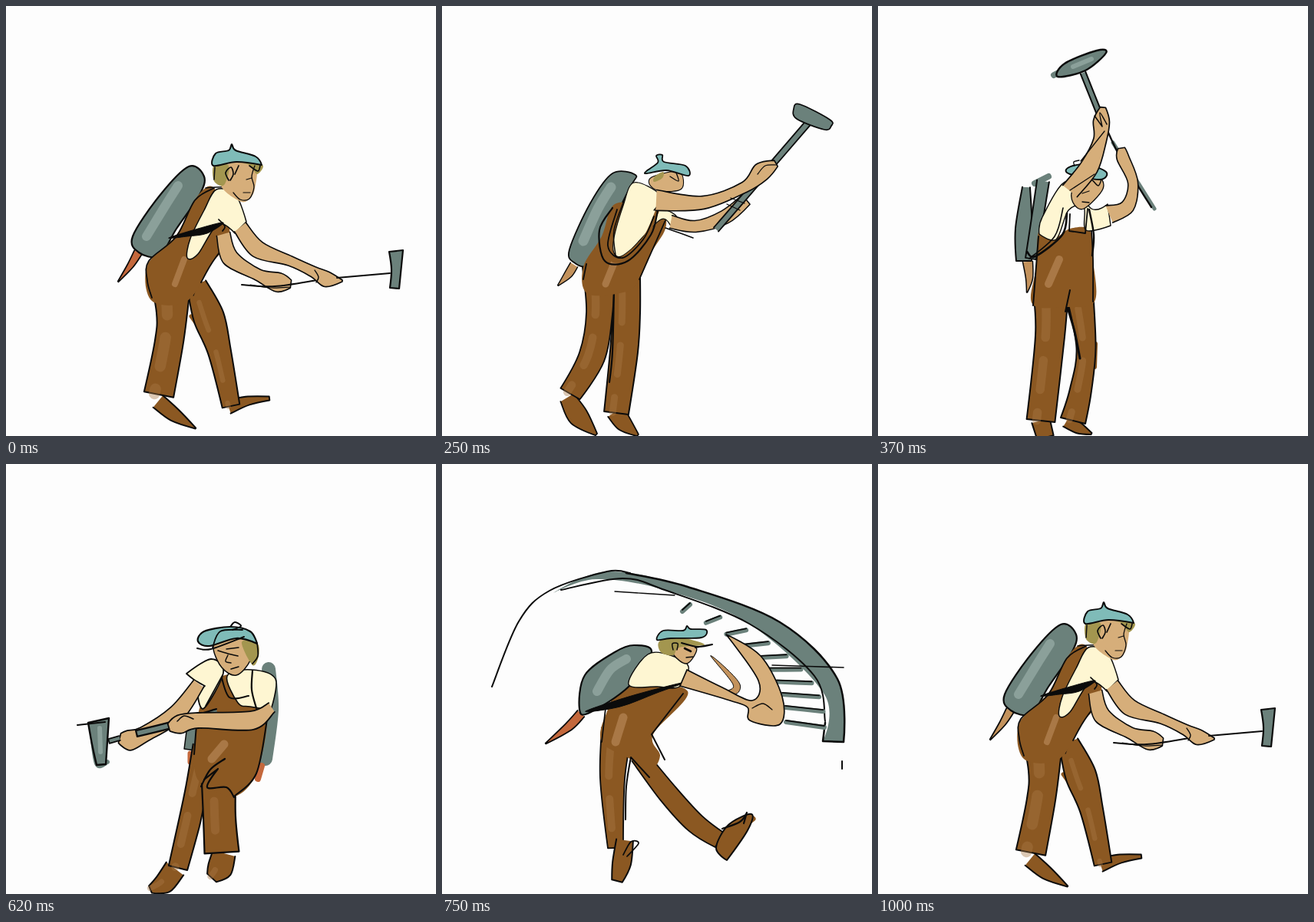
An HTML page for the animation above (1120 ms loop, 560x560 px).

```html
<!DOCTYPE html>
<html lang="en">
<head>
<meta charset="utf-8">
<title>Hammer swing</title>
<style>
html, body { margin: 0; width: 100%; height: 100%; overflow: hidden; background: #fdfdfd; }
svg { display: block; width: 100%; height: 100%; }
</style>
</head>
<body>
<svg id="stage" viewBox="0 0 560 560" fill="none" stroke-linecap="round" stroke-linejoin="round"></svg>
<script>
const INK = '#0b0b0b', BROWN = '#8b5822', LIGHT = '#a97846', GRAY = '#6b817b', MIST = '#8ba09a';
const TEAL = '#7fbbb8', SKIN = '#d6ae7a', CREAM = '#fef6d2', HAIR = '#a3964f', FIRE = '#c4683c', TAN = '#c3925c';
const LOOP = 1120;
let out = '';

const path = (d, fill, stroke, width, extra = '') => {
  out += `<path d="${d}" fill="${fill}" stroke="${stroke}" stroke-width="${width}" ${extra}/>`;
};

// "x,y" points; a trailing "!" makes a sharp corner.
const read = text => text.split(' ').map(s => ({ p: s.replace('!', '').split(',').map(Number), sharp: s.endsWith('!') }));

// Smooth curve through the points.
function curve(pts, closed) {
  const n = pts.length;
  const get = i => pts[closed ? (i + n) % n : Math.max(0, Math.min(n - 1, i))];
  const handle = (i, dir) => {
    const { p, sharp } = get(i);
    if (sharp) return p;
    const a = get(i - 1).p, b = get(i + 1).p;
    return p.map((v, k) => (v + dir * (b[k] - a[k]) / 6).toFixed(1));
  };
  let d = 'M' + pts[0].p;
  for (let i = 0; i < (closed ? n : n - 1); i++) d += `C${handle(i, 1)} ${handle(i + 1, -1)} ${get(i + 1).p}`;
  return d + (closed ? 'Z' : '');
}

const area = (color, ink, text) => path(curve(read(text), true), color, ink ? INK : 'none', ink);
const line = (width, text, color = INK) => path(curve(read(text)), 'none', color, width);

// A tapering shape along "x,y,width" points, with an inked outline open at its root.
function limb(color, ink, text) {
  const axis = text.split(' ').map(s => s.split(',').map(Number)), last = axis.length - 1;
  const side = dir => axis.map(([x, y, w], i) => {
    const a = axis[Math.max(0, i - 1)], b = axis[Math.min(last, i + 1)];
    const dx = b[0] - a[0], dy = b[1] - a[1], k = dir * w / 2 / Math.hypot(dx, dy);
    return { p: [x - dy * k, y + dx * k], sharp: i === last };
  });
  path(curve([...side(1), ...side(-1).reverse()]), color, ink ? INK : 'none', ink);
  if (color === BROWN && axis[0][2] > 25) {
    path(curve(side(.3).map(q => ({ p: q.p }))), 'none', LIGHT, axis[0][2] / 4, 'opacity=".4" stroke-dasharray="38 30" stroke-dashoffset="-24"');
  }
}

// Standing, hammer held low
function standLower(flame) {
  limb(flame, 1.7, '172,321,11 162,338,8 146,359,1');
  limb(BROWN, 2, '198,515,20 220,533,17 247,550,1');
  limb(BROWN, 2, '290,522,18 316,514,11 343,511,5');
  line(5, '241,404 256,425', BROWN);
  limb(BROWN, 2, '248,362,26 264,405,40 278,450,30 293,521,23');
  limb(BROWN, 2, '214,340,58 216,400,40 212,440,37 199,506,39');
  line(1.3, '238,383 245,368');
  line(1.3, '244,377 248,366');
}
function standUpper() {
  area(GRAY, 2.2, '238,209 258,222 252,246 222,290 200,325 173,321 165,300 200,247');
  line(12, '224,234 205,264 183,300', MIST);
  area(BROWN, 0, '271,237 246,252 222,298 184,338 190,384 236,384 268,335 292,301');
  line(1.8, '271,237 246,253 222,300 186,332 184,358 190,380');
  line(1.8, '292,302 268,335 254,360');
  line(8, '232,330 220,362', LIGHT);
  area(CREAM, 1.5, '274,239 299,246 313,281! 298,296! 276,284 250,323 236,328 240,303 258,266');
  area(INK, 1, '212,302 250,290 283,282 262,296 236,300');
  line(1.7, '277,278 285,287 282,293');
  line(1.5, '260,237 285,236 297,243');
}
function standHead() {
  area(SKIN, 0, '287,207 324,206 324,238 316,252 304,254 280,234');
  area(HAIR, 0, '271,207 290,208 284,233 271,228');
  area(HAIR, 0, '305,205 334,207 327,219 317,207');
  line(1.3, '324,208 320,222 323,236 317,251 305,252 296,243');
  line(1.5, '272,210 271,226');
  line(1.7, '290,227 286,217 293,210 296,219 292,227');
  line(1.7, '303,208 298,219');
  line(1.7, '317,208 328,215 331,208');
  line(1.2, '313,226 320,224');
  line(1.2, '309,243 318,243');
  area(TEAL, 2, '270,208 273,192 290,188 294,180 299,188 325,196 333,207! 300,203');
}
function standArms() {
  limb(SKIN, 1.6, '283,297,18 292,328,22 328,350,15 355,360,25 371,362,10');
  line(2, '307,363 350,365 405,357');
  line(1.2, '318,363 345,367 370,366');
  limb(SKIN, 1.7, '305,288,19 328,317,22 370,332,13 400,346,14 418,356,20 438,358,2');
  line(2, '431,354 500,348');
  line(1.4, '402,344 407,353 404,360');
  area(GRAY, 2.2, '499,320! 517,318! 512,368! 500,367! 502,343');
}

// Hammer lifted in front
function raiseLower() {
  limb(TAN, 1.4, '172,337,11 164,350,10 151,364,1');
  limb(BROWN, 1.8, '163,510,20 178,535,26 201,558,3');
  limb(BROWN, 1.8, '226,528,24 238,545,20 255,559,3');
  limb(BROWN, 2, '240,350,36 240,400,36 237,450,36 227,530,32');
  limb(BROWN, 1.8, '204,340,42 205,400,34 195,457,34 167,505,29');
  line(2.2, '224,369 222,450 218,490');
}
function raiseUpper() {
  area(GRAY, 1.8, '252,220 222,218 193,257 166,317 172,334 191,337 212,300 245,236');
  line(13, '220,236 203,264 184,306', MIST);
  area(BROWN, 0, '225,258 208,300 184,340 190,375 240,372 257,356 272,322 291,290 288,266 268,262');
  line(1.8, '291,279 272,322 257,356');
  line(1.8, '188,336 184,356');
  line(9, '224,335 213,362', LIGHT);
  area(CREAM, 1.2, '250,230 284,246 276,266! 292,266 306,275 301,289 285,278 245,318 228,326 223,308 236,260');
  line(5, '280,268 262,305 228,332 214,318', BROWN);
  line(2.2, '222,263 205,292 212,332 242,332 272,298 281,266');
  line(1.8, '228,265 216,312 235,328 262,304 276,274');
  line(1.5, '238,251 224,292 226,325');
}
function raiseHead() {
  area(SKIN, 1.1, '275,222 309,216 312,238 284,241 270,232');
  area(HAIR, 0, '277,222 288,216 287,224 276,229');
  line(1.4, '297,222 308,228 305,217');
  area(TEAL, 1.8, '264,218 281,204 279,195 287,194 289,203 317,208 321,221 292,214');
}
function raiseArms() {
  limb(SKIN, 1.5, '298,281,17 330,287,15 368,275,18 396,252,16');
  line(1.5, '291,289 308,295 327,302');
  limb(GRAY, 1.8, '357,291,8 384,260,8 477,152,8');
  limb(SKIN, 1.7, '279,253,27 340,256,17 394,236,14 416,216,24 435,205,9');
  line(1.2, '411,219 421,208 436,207');
  line(1.3, '371,258 388,266');
  line(1.3, '376,250 394,257');
  line(6, '464,131 506,154', GRAY);
  area(GRAY, 1.7, '458,134 466,128 505,148 507,156 498,161 462,147');
}

// Hammer overhead
function overheadLower() {
  limb(TAN, 1.5, '195,333,13 197,355,9 194,373,1');
  limb(BROWN, 2, '212,540,24 218,562,22');
  limb(BROWN, 2, '246,540,18 262,550,14 278,557,2');
  line(6, '283,440 282,470', BROWN);
  limb(BROWN, 2, '262,370,36 271,445,25 264,500,28 254,540,33');
  limb(BROWN, 2, '225,370,46 224,430,38 212,540,37');
  line(3, '246,390 256,424 263,459');
}
function overheadUpper() {
  line(8, '204,231 222,222', GRAY);
  limb(GRAY, 2, '193,236,10 190,290,22 190,332,20');
  limb(GRAY, 2, '215,228,16 207,280,15 199,329,14');
  area(BROWN, 0, '210,292 206,340 201,388 244,392 282,385 280,330 276,292 250,290 230,302');
  line(2, '209,300 202,390');
  line(1.8, '278,291 280,330 280,385');
  line(2, '250,370 244,398');
  line(10, '236,330 222,362', LIGHT);
  area(CREAM, 1.4, '246,228 214,275 210,297! 232,304 248,266 268,262 271,292 303,286! 299,258! 278,264');
  line(2.6, '246,270 240,298 205,326 194,320');
  line(1.6, '241,263 230,300 197,329');
  line(1.8, '250,271 249,293! 270,296! 273,264');
  line(2.4, '275,265 281,298 279,325');
}
function overheadHead() {
  area(SKIN, 1.3, '255,238 285,222 293,238 268,264 254,256');
  line(1.5, '262,228 268,236 277,226 287,234 292,222');
  line(1.3, '266,244 275,241');
  line(1.3, '266,255 275,256');
  area(TEAL, 2, '247,211 270,206 297,216 289,226 250,219');
  line(1.3, '256,208 255,203 262,201');
}
function overheadArms() {
  limb(GRAY, 2, '267,87,7 291,147,7');
  line(5, '306,178 360,264', GRAY);
  line(2.4, '294,151 314,194 356,262');
  limb(SKIN, 1.7, '250,241,24 275,210,24 289,175,17 291,150,21 293,132,7');
  line(1.3, '264,202 295,163');
  line(1.3, '250,240 282,219');
  line(1.5, '282,143 292,157! 289,139 298,154');
  limb(SKIN, 1.6, '301,271,24 325,261,18 332,230,13 319,198,16 317,185,9');
  line(8, '229,90 278,65', GRAY);
  area(GRAY, 2.4, '234,92 243,75 285,58 297,61 270,84');
  line(6, '254,79 278,69', MIST);
}

// Turned to the other side
function turnLower() {
  line(18, '342,267 346,320 338,384', GRAY);
  limb(GRAY, 1.5, '243,345,15 239,372,14');
  line(7, '240,377 240,388', FIRE);
  line(8, '333,393 328,410', FIRE);
  limb(BROWN, 2, '220,527,28 205,547,26 188,554,10');
  limb(BROWN, 2, '284,507,30 278,528,32 268,539,16');
  limb(BROWN, 2, '263,370,40 248,425,29 238,470,28 224,526,25');
  limb(BROWN, 2.2, '277,415,44 278,460,42 281,506,45');
}
function turnUpper() {
  area(BROWN, 0, '285,275 255,310 246,360 246,400 258,418 297,433 326,403 340,333 325,305 318,288');
  line(2, '248,340 245,378');
  line(2.2, '254,420 266,398 285,384');
  line(2.2, '258,411 276,397! 262,421 287,421 297,434');
  line(2, '297,433 326,403 340,333');
  line(11, '284,365 268,384', LIGHT);
  area(CREAM, 1.6, '288,276 320,268 351,280 345,320! 318,316 302,311');
  line(2, '280,275 291,304 316,302');
  line(2.2, '321,269 320,294 326,318');
  area(CREAM, 1.8, '235,273! 267,254 283,272 258,318 250,300 259,289! 245,281');
  line(1.6, '282,275 260,315');
}
function turnHead() {
  area(SKIN, 1.5, '270,240 278,225 320,232 318,256 300,275 281,265');
  area(HAIR, 0, '307,232 327,233 329,250 321,262');
  line(1.7, '327,233 328,250 321,260');
  line(1.6, '276,243 289,247 302,250');
  line(1.4, '287,241 303,239');
  line(1.4, '289,249 286,257 293,259');
  line(1.5, '293,267 303,264');
  area(TEAL, 2.2, '250,231 258,218 292,212 318,218 327,234! 300,227 265,237');
  line(2, '249,240 267,241 310,225');
  line(2, '292,212 298,206 306,211 295,216');
  line(1.8, '269,239 279,218 308,216');
}
function strikeArms() {
  limb(SKIN, 1.7, '251,286,16 222,325,22 180,352,20 160,360,26 148,357,13');
  limb(GRAY, 1.8, '148,357,6 134,361,6');
  limb(GRAY, 2.2, '275,323,8 215,340,8 170,351,8');
  limb(SKIN, 1.8, '346,317,14 320,334,24 250,334,20 226,339,24 212,343,10');
  line(1.5, '223,335 232,328 244,332');
  line(6, '111,340 118,390 132,388', GRAY);
  area(GRAY, 2.4, '107,337! 134,331! 130,391! 118,392! 112,365');
  line(6, '122,344 123,375', MIST);
  line(2, '93,340 129,336');
}
function swingArms() {
  limb(GRAY, 2, '208,237,8 146,175,8');
  limb(SKIN, 1.7, '252,273,20 222,258,20 204,238,20 205,226,10');
  limb(SKIN, 1.7, '340,309,14 310,308,22 255,272,18 225,243,18 214,234,10');
  area(GRAY, 2.4, '125,194! 154,151! 170,163! 142,207!');
}

// Fast swing
function blur() {
  area(GRAY, 0, '145,168 215,140 320,160 440,206 515,280 523,363! 496,361! 498,300 400,208 290,164 200,150');
  line(2, '65,290 100,205 140,165 215,140 245,142');
  line(2.5, '240,142 320,160 440,206 515,280 523,362! 496,361! 499,337');
  line(2, '155,164 235,149 290,164 400,208 485,276 499,335');
  line(1.3, '225,166 303,171');
  line(1.6, '430,262 523,265');
  line(2, '521,387 521,397');
  // Speed marks fan out from level at the fists to steep at the top
  for (let i = 0; i < 10; i++) {
    const u = i / 9, x = 448 - 135 * u ** 2.2, y = 334 - 144 * u ** .92;
    const reach = 50 - 40 * u ** 2, rise = 7 - 16 * u;
    const mark = `${x},${y} ${x + reach},${y + rise}`;
    out += '<g transform="translate(0 2)">';
    line(6, mark, GRAY);
    out += '</g>';
    line(1.8, mark);
  }
}
function leapLower() {
  limb(FIRE, 1.8, '181,325,12 165,342,11 135,364,1');
  limb(BROWN, 1.8, '256,380,22 295,430,26 330,468,26 362,490,22');
  limb(BROWN, 1.8, '228,345,40 222,410,32 226,500,20');
  limb(BROWN, 2, '238,490,22 234,520,24 228,543,14');
  line(1.7, '236,509 246,492 256,494 241,511');
  line(7, '376,484 405,462', BROWN);
  area(BROWN, 2, '357,500 373,470 403,456 398,477 371,516!');
  line(2.2, '365,475 388,466 397,454! 393,468');
}
function leapUpper() {
  area(BROWN, 0, '240,288 214,325 208,362 245,384 270,400 284,380 275,352 320,296');
  line(1.8, '213,318 208,362');
  line(2, '314,299 273,352! 290,385');
  line(2, '239,463 240,420 246,382! 270,408');
  line(11, '236,330 226,362', LIGHT);
  area(GRAY, 2.2, '250,236 273,245 243,290 192,324 179,319 186,275 225,245');
  line(12, '240,254 219,268 202,296', MIST);
  area(CREAM, 1.4, '243,287 268,248 300,250 321,264 309,290 280,290');
  area(INK, 1, '187,322 250,301 317,284 280,298 232,316');
}
function leapHead() {
  area(SKIN, 1.3, '296,232 328,237 330,247 318,260 302,249');
  area(HAIR, 0, '283,231 305,225 342,235 309,239 301,249 285,245');
  line(2, '312,233 333,238 352,235! 330,239');
  line(2.6, '316,240 324,244');
  line(1.5, '301,242 300,234 307,234 306,242');
  line(1.3, '318,252 327,251');
  area(TEAL, 1.8, '280,229 288,217 314,217 319,211 324,215 344,216 338,226 298,227');
}
function leapArms() {
  area(TAN, 1, '350,250 372,268 388,287 384,299 371,296 379,287');
  area(SKIN, 1.7, '319,268! 310,289! 375,308 398,317 401,334 440,339 443,303 415,250 370,222! 412,282 404,308 365,291');
  line(1.3, '404,318 418,312 430,320');
}

// A part is a drawing function, or a pair of function and transform.
const tilted = (part, move) => () => {
  out += `<g transform="${move}">`;
  part();
  out += '</g>';
};
const stand = [standUpper, standHead];
const raise = [raiseLower, raiseUpper, raiseHead];
const turn = [turnLower, turnUpper, turnHead];
const lowHot = () => standLower(FIRE), lowPale = () => standLower(TAN);

const POSES = [
  { at: 0, parts: [lowHot, ...stand, standArms] },
  { at: 120, parts: [...raise, tilted(raiseArms, 'translate(13 0) rotate(21 283 252)')] },
  { at: 250, parts: [...raise, raiseArms] },
  { at: 370, parts: [overheadLower, overheadUpper, overheadHead, overheadArms] },
  { at: 500, parts: [...turn, swingArms] },
  { at: 620, parts: [...turn, strikeArms] },
  { at: 750, parts: [blur, leapLower, leapUpper, leapHead, leapArms] },
  { at: 870, parts: [lowHot, ...stand, tilted(standArms, 'rotate(7 300 280)')] },
  { at: 1000, parts: [lowPale, ...stand, standArms] }
];

for (const pose of POSES) {
  out += '<g>';
  pose.parts.forEach(part => part());
  out += '</g>';
}
const stage = document.getElementById('stage');
stage.innerHTML = out;
const groups = [...stage.children];

function show(time) {
  const t = time % LOOP;
  const current = POSES.filter(pose => pose.at <= t).length - 1;
  groups.forEach((g, i) => { g.style.display = i === current ? '' : 'none'; });
}

const start = performance.now();
function tick() {
  show(performance.now() - start);
  requestAnimationFrame(tick);
}
tick();
</script>
</body>
</html>
```
